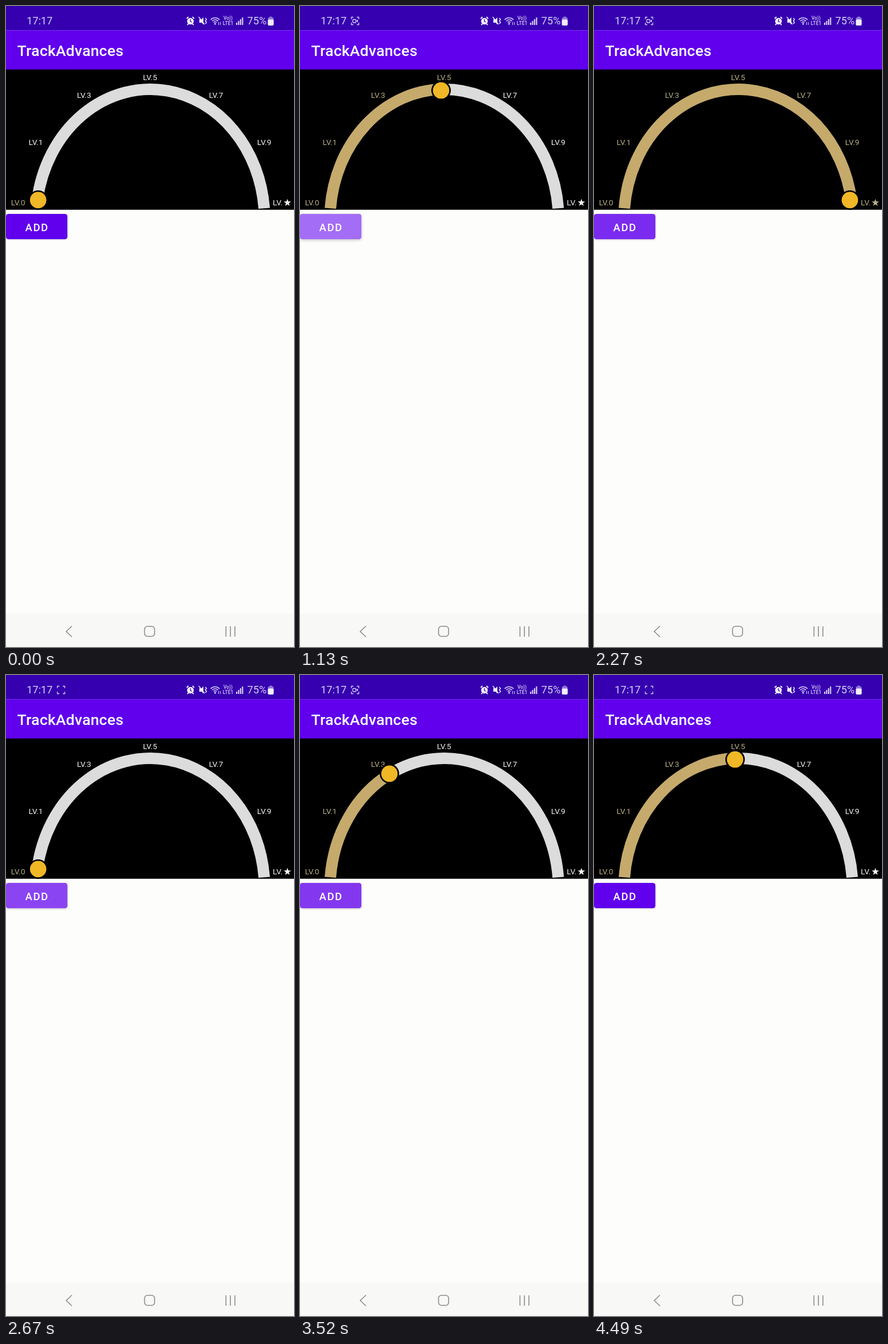
Animation, 502 px wide and 1116 px high, one loop 4.53 s. Source, as an HTML page with a canvas:

```html
<!DOCTYPE html>
<html lang="en">
<head>
<meta charset="utf-8">
<title>TrackAdvances</title>
<style>
  html, body { margin: 0; width: 100%; height: 100%; overflow: hidden; background: #fdfdfc; }
  canvas { display: block; }
</style>
</head>
<body>
<canvas id="stage" width="502" height="1116"></canvas>
<script>
const c = document.getElementById('stage').getContext('2d');
const LOOP = 4530, W = 502, MID = W / 2, DEG = Math.PI / 180;
const BAR = '#3600b1', PURPLE = '#6000ec', STATUS = '#d9cff3', BRIGHT = '#f2eefb';
const GOLD = '#c5aa6c', LABEL_ON = '#b9b084', GREY = '#8c8c8c';

const labels = ['0', '1', '3', '5', '7', '9', ''];
const coinAngles = [1.2, 30.8, 60.8, 88.5, 119.2, 149.2, 178.8];
// Each tap moves one level on, wrapping after the star
const taps = [300, 640, 980, 1330, 1680, 1955, 2400, 2846, 3230, 3640];

const clamp = v => Math.max(0, Math.min(1, v));
const range = (n, f) => Array.from({ length: n }, (_, i) => f(i));

function rect(x, y, w, h, color, r = 0) {
  c.fillStyle = color;
  c.beginPath();
  c.roundRect(x, y, w, h, r);
  c.fill();
}

function outline(x, y, size, r) {
  c.beginPath();
  c.roundRect(x, y, size, size, r);
  c.stroke();
}

function disc(x, y, r, color) {
  c.fillStyle = color;
  c.beginPath();
  c.arc(x, y, r, 0, 7);
  c.fill();
}

function trace(points) {
  c.beginPath();
  for (const [x, y] of points) c.lineTo(x, y);
}

function line(points, color, width) {
  c.strokeStyle = color;
  c.lineWidth = width;
  trace(points);
  c.stroke();
}

function polygon(points, color) {
  c.fillStyle = color;
  trace(points);
  c.fill();
}

function text(s, x, y, size, color, { weight = 400, spacing = 0, align = 'left' } = {}) {
  c.font = `${weight} ${size}px Roboto, sans-serif`;
  c.letterSpacing = spacing + 'px';
  c.textAlign = align;
  c.fillStyle = color;
  c.fillText(s, x, y);
}

// Runs a drawing with its origin at x, y
function at(x, y, drawing) {
  c.save();
  c.translate(x, y);
  drawing();
  c.restore();
}

function recorder(showCamera) {
  for (let i = 0; i < 4; i++) {
    line([[-6.5, -3], [-6.5, -6.5], [-3, -6.5]], STATUS, 1.3);
    c.rotate(90 * DEG);
  }
  if (!showCamera) return;
  outline(-4, -2.5, 5.5, 1);
  polygon([[2, 0], [5, -2.5], [5, 2.5]], STATUS);
}

function alarm() {
  disc(0, 0, 5.8, BRIGHT);
  line([[0, -3.5], [0, 0.5], [2.5, 1.5]], BAR, 1.3);
  for (const side of [-1, 1]) {
    line([[side * 6.5, -4.5], [side * 3.5, -7.5]], BRIGHT, 2);
    line([[side * 3.5, 4.5], [side * 5.5, 6.5]], BRIGHT, 2);
  }
}

function mutedSpeaker() {
  rect(-6, -3, 4, 6, BRIGHT);
  polygon([[-4, 0], [1, -6.5], [1, 6.5]], BRIGHT);
  line([[-7, -7], [3, 6]], BRIGHT, 1.4);
  line(range(5, i => [4.5 + i % 2 * 2, (i - 2) * 2.5]), BRIGHT, 1.4);
}

function wireless() {
  c.strokeStyle = STATUS;
  c.lineWidth = 1.6;
  for (let r = 3.5; r < 11; r += 3.5) {
    c.beginPath();
    c.arc(0, 0, r, -137 * DEG, -43 * DEG);
    c.stroke();
  }
  disc(0, 0, 1.6, STATUS);
  for (const side of [-1, 1]) rect(7 + side * 1.5, -3, 1, 5, STATUS);
}

function battery() {
  rect(2.5, -1.5, 5, 3, '#8f77d4', 1);
  rect(0, 0, 10, 14, '#8f77d4', 2);
  rect(0, 3.5, 10, 10.5, BRIGHT, 2);
}

function drawStatus(t) {
  rect(0, 0, W, 42.3, BAR);
  text('17:17', 36, 32, 18.2, STATUS);
  if (t >= 300) at(96, 26, () => recorder(t % 900 < 825));
  at(321.5, 26.5, alarm);
  at(343, 26, mutedSpeaker);
  at(364.5, 31, wireless);
  ['Vo))', 'LTE1'].forEach((s, i) => text(s, 387, 24 + 9 * i, 8.5, STATUS, { weight: 500, align: 'center' }));
  for (let i = 0; i < 4; i++) rect(401 + i * 3.4, 29 - i * 3, 2.2, 4 + i * 3, STATUS);
  text('75%', 420.5, 32, 18.2, STATUS);
  at(456.5, 20, battery);
}

function drawTrack(level, x, y) {
  const cy = 372, rx = 199.3, ry = 227, end = 5 * DEG;
  const split = Math.PI + Math.atan2((cy - y) / ry, (MID - x) / rx);
  const arc = (from, to, color) => {
    c.strokeStyle = color;
    c.lineWidth = 20;
    c.beginPath();
    c.ellipse(MID + 0.5, cy, rx, ry, 0, from, to);
    c.stroke();
  };
  if (level > 0) arc(Math.PI + end, split, GOLD);
  if (level < 6) arc(split, 2 * Math.PI - end, '#dcdcdc');
}

function drawLabel(label, i, level) {
  const angle = i * 30 * DEG;
  const x = MID - 230 * Math.cos(angle);
  const y = 347 - 218 * Math.sin(angle) ** 1.05;
  const color = i <= level ? LABEL_ON : '#f4f4f4';
  if (label) return text('LV.' + label, x, y, 13.7, color, { align: 'center' });

  text('LV.', x - 16, y, 13.7, color);
  polygon(range(10, k => {
    const r = k % 2 ? 2.7 : 6.8, turn = (k * 36 - 90) * DEG;
    return [x + 9.5 + r * Math.cos(turn), y - 4.5 + r * Math.sin(turn)];
  }), color);
}

function drawGauge(level) {
  const angle = coinAngles[level] * DEG;
  const x = MID - 195 * Math.cos(angle), y = 342 - 195 * Math.sin(angle);
  rect(0, 110.6, W, 244.2, '#000');
  drawTrack(level, x, y);
  labels.forEach((label, i) => drawLabel(label, i, level));
  disc(x, y, 17, '#000');
  disc(x, y, 14.3, '#f0b726');
}

function drawButton(t) {
  const tap = taps.findLast(time => t >= time - 80) ?? -LOOP;
  const grow = clamp((t - tap + 80) / 180);
  const fade = 1 - clamp((t - tap - 190) / 200);
  const face = color => rect(0, 0, 107, 44, color, 4.5);

  c.save();
  c.shadowColor = 'rgba(0,0,0,.25)';
  c.shadowBlur = 2 + 3 * fade;
  c.shadowOffsetY = 0.5 + fade;
  face(PURPLE);
  c.restore();

  c.save();
  c.clip();
  c.globalAlpha = fade * grow * 0.13;
  face('#fff');
  c.globalAlpha = fade * 0.34;
  disc(66, 23, 12 + 58 * grow, '#fff');
  c.restore();
  text('ADD', 33.5, 29.5, 18.4, '#fff', { weight: 500, spacing: 1.65 });
}

function drawNavigation() {
  rect(0, 1058, W, 58, '#f8f8f6');
  at(0, 1089, () => {
    line([[115, -9.5], [105, 0], [115, 9.5]], GREY, 1.6);
    outline(241.5, -9, 17.5, 5);
    for (let i = -1; i < 2; i++) line([[391.2 + i * 7.8, -9], [391.2 + i * 7.8, 9]], GREY, 1.6);
  });
}

function draw(t) {
  const level = taps.filter(time => t >= time).length % labels.length;
  rect(0, 0, W, 1116, '#fdfdfc');
  drawStatus(t);
  rect(0, 42.3, W, 69, PURPLE);
  text('TrackAdvances', 19.5, 87, 26.5, '#fff', { weight: 500, spacing: 0.2 });
  drawGauge(level);
  at(0, 362, () => drawButton(t));
  drawNavigation();
}

const start = performance.now();
function tick() {
  draw((performance.now() - start) % LOOP);
  requestAnimationFrame(tick);
}
tick();
</script>
</body>
</html>
```
